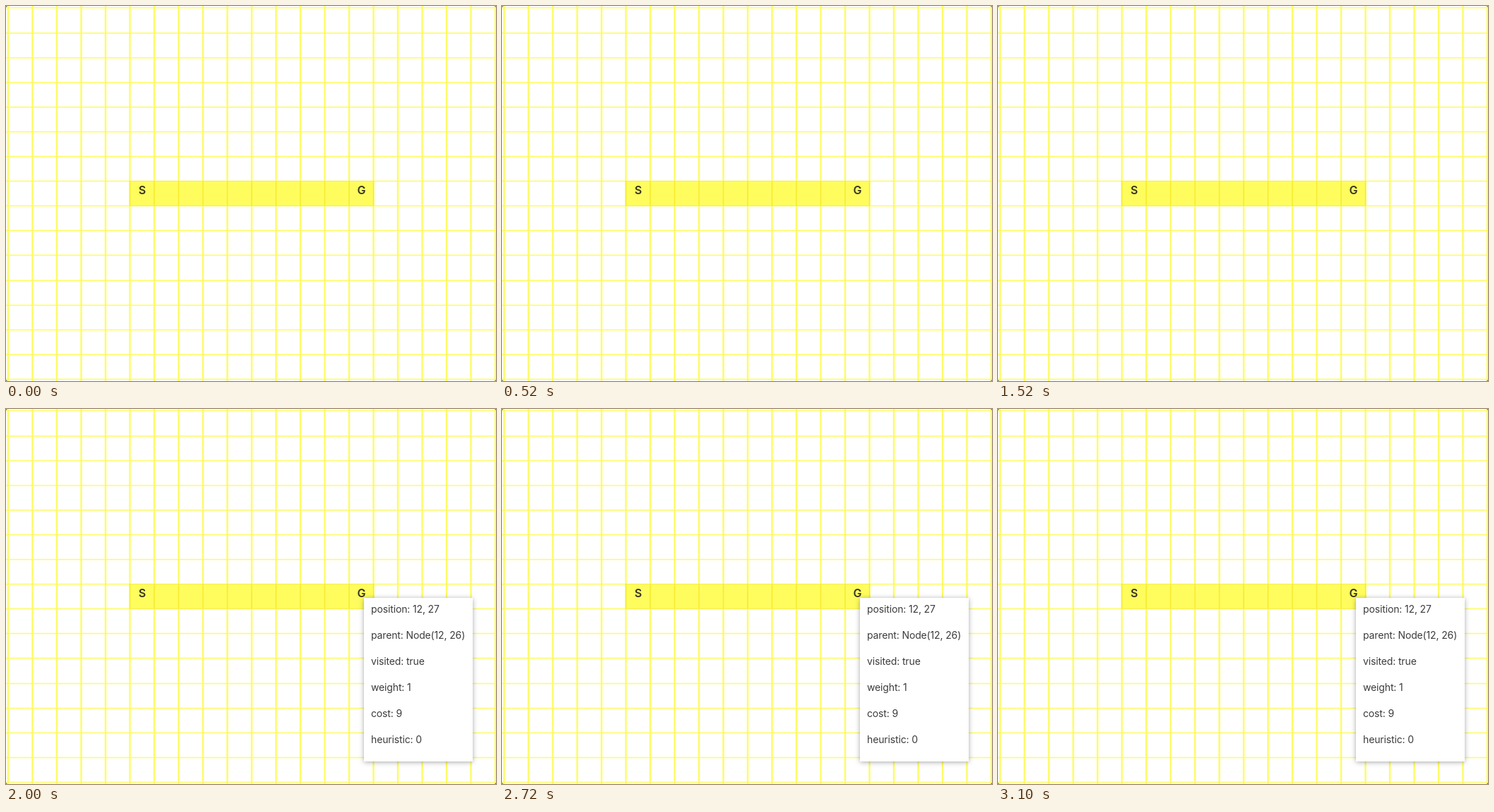
Recreate the animation shown at these times as an HTML page. Size 694 px wide and 532 px high, loop 3400 ms.

```html
<!DOCTYPE html>
<html lang="en">
<head>
<meta charset="utf-8">
<title>Path grid</title>
<style>
  html, body { margin: 0; width: 100%; height: 100%; overflow: hidden; background: #fff; }
  svg { position: absolute; left: 0; top: 0; }
  text { font: 600 16px Inter, sans-serif; fill: #36361f; text-anchor: middle; }
  .tip {
    position: absolute; left: 507px; top: 268px; width: 154px; height: 232px;
    box-sizing: border-box; padding: 6px 0 0 10px;
    background: #fff; box-shadow: 0 1px 7px rgba(0, 0, 0, .34);
    font: 14px/19px Inter, sans-serif; letter-spacing: -.14px; color: #3c3c3c;
    white-space: nowrap;
    animation: show 3400ms step-end infinite;
  }
  .tip p { margin: 0 0 18px; }
  @keyframes show {
    0% { opacity: 0; }
    58.8235% { opacity: 1; }
  }
</style>
</head>
<body>
<svg width="694" height="532" viewBox="0 0 694 532">
  <g fill="none">
    <path id="halo" stroke="#ffffc8" stroke-width="3.4"/>
    <path id="rows" stroke="#fdfb5c" stroke-width="1.4"/>
    <path id="cols" stroke="#fdfb5c" stroke-width="1.8"/>
  </g>
  <rect x="176" y="248" width="345" height="35.5" fill="#fffc5e"/>
  <path id="cells" fill="none" stroke="#f5ea2c" stroke-width="1.5"/>
  <path d="M176 248.5H521M176 283.2H521" stroke="#f7ee4c"/>
  <path d="M0 0h2L0 2zM694 0h-2l2 2zM0 532h2l-2-2zM694 532h-2l2-2z" fill="#77775a"/>
  <text x="193" y="267">S</text>
  <text x="503.5" y="267">G</text>
</svg>
<div class="tip" id="tip"></div>
<script>
  const colX = i => 3 + 34.5 * i;
  const rowY = i => Math.floor(2.95 + 35.1 * i) + .5;
  const join = (n, line) => Array.from({ length: n }, (_, i) => line(i)).join('');
  const draw = (id, d) => document.getElementById(id).setAttribute('d', d);

  const columns = join(21, i => `M${colX(i)} 0V532`);
  draw('halo', columns);
  draw('cols', columns);
  draw('rows', join(16, i => `M0 ${rowY(i)}H694`));
  draw('cells', join(11, i => `M${colX(i + 5)} 248V283.5`));

  const node = {
    position: '12, 27',
    parent: 'Node(12, 26)',
    visited: true,
    weight: 1,
    cost: 9,
    heuristic: 0
  };
  const tip = document.getElementById('tip');
  for (const [key, value] of Object.entries(node)) {
    const row = document.createElement('p');
    row.textContent = `${key}: ${value}`;
    tip.append(row);
  }
</script>
</body>
</html>
```
